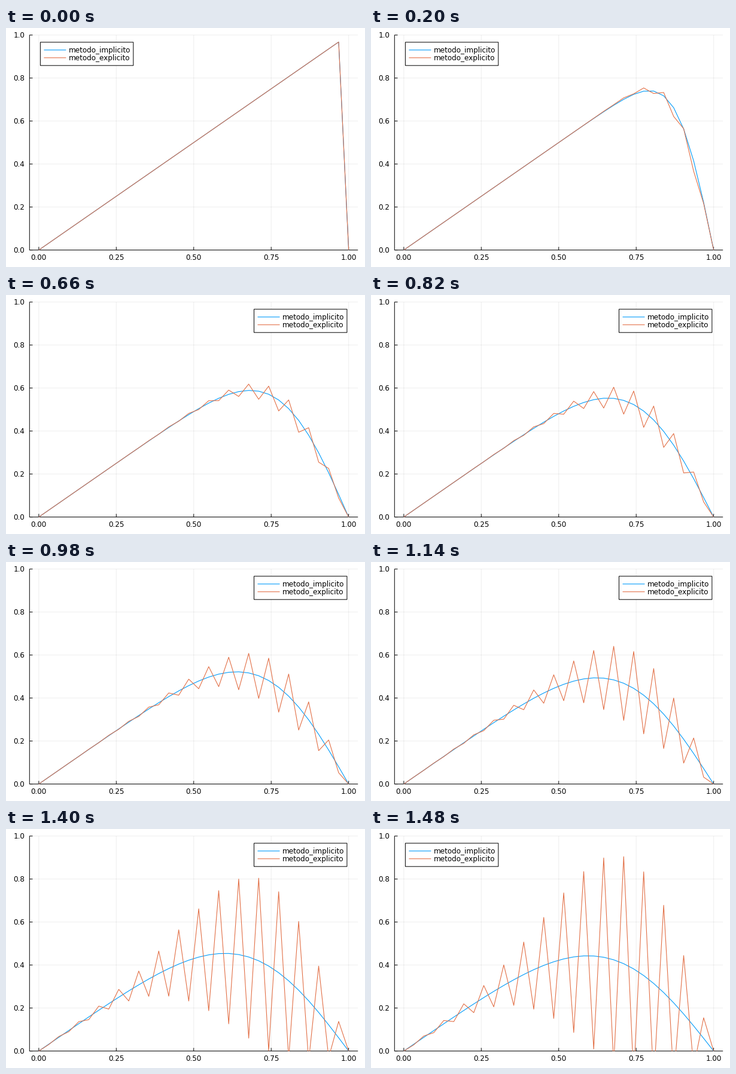
A matplotlib script that plays this animation: 600x400 px, repeating every 1.5 s.

```python
import numpy as np
import matplotlib.pyplot as plt
from matplotlib.animation import FuncAnimation
from matplotlib.patches import Rectangle

W, H, DPI = 600, 400, 100
FRAMES, INTERVAL = 75, 20
NODES, R = 32, 0.52            # grid points, dt / dx^2
LEFT, RIGHT, TOP, BOTTOM = 39.3, 588.2, 11.8, 371.6
X_MIN, X_MAX = -0.03, 1.03
BLUE, ORANGE = "#009AFA", "#E26F46"
PX = 72 / DPI                  # points per pixel


def to_px(x):
    return LEFT + (x - X_MIN) / (X_MAX - X_MIN) * (RIGHT - LEFT)


def to_py(y):
    return BOTTOM - y * (BOTTOM - TOP)


def solve():
    """Heat equation from u = x with u(1) = 0, by both schemes."""
    x = np.linspace(0, 1, NODES)
    start = x.copy()
    start[-1] = 0
    n = NODES - 2
    lap = 2 * np.eye(n) - np.eye(n, k=1) - np.eye(n, k=-1)
    forward = np.eye(n) - R * lap
    backward = np.linalg.inv(np.eye(n) + R * lap)

    def march(step):
        states = [start]
        for _ in range(FRAMES - 1):
            u = np.zeros(NODES)
            u[1:-1] = step @ states[-1][1:-1]
            states.append(u)
        return states

    return x, march(backward), march(forward)


xs, implicit, explicit = solve()

fig = plt.figure(figsize=(W / DPI, H / DPI), dpi=DPI, facecolor="white")
ax = fig.add_axes([0, 0, 1, 1])
ax.set_xlim(0, W)
ax.set_ylim(H, 0)
ax.axis("off")


def line(x, y, color="black", width=1.0, z=2, **kw):
    return ax.plot(x, y, color=color, lw=width * PX, zorder=z, snap=False,
                   solid_capstyle="butt", solid_joinstyle="round", **kw)[0]


def label(x, y, text, ha, z=2):
    return ax.text(x, y, text, ha=ha, va="baseline", fontsize=12 * PX,
                   family="DejaVu Sans", color="black", zorder=z)


# grid, ticks and tick labels
for v in np.linspace(0, 1, 5):
    p = to_px(v)
    line([p, p], [TOP, BOTTOM], alpha=0.065, z=1)
    line([p, p], [BOTTOM, BOTTOM - 5.2])
    label(p, 387.6, f"{v:.2f}", "center")
for v in np.linspace(0, 1, 6):
    p = to_py(v)
    line([LEFT, RIGHT], [p, p], alpha=0.065, z=1)
    line([LEFT, LEFT + 5.2], [p, p])
    label(31.3, p + 4.4, f"{v:.1f}", "right")
line([LEFT, RIGHT], [BOTTOM, BOTTOM])
line([LEFT, LEFT], [TOP, BOTTOM])

# curves
area = Rectangle((LEFT, TOP), RIGHT - LEFT, BOTTOM - TOP, transform=ax.transData)
curves = [line([], [], c, 1.1, z=3) for c in (BLUE, ORANGE)]
for c in curves:
    c.set_clip_path(area)

# legend
BOX_W, BOX_H, BOX_Y = 155.4, 39, 23.8
box = Rectangle((0, BOX_Y), BOX_W, BOX_H, fc="white", ec="black",
                lw=PX, zorder=4, snap=False)
ax.add_patch(box)
keys, names = [], []
for row, (color, name) in enumerate(((BLUE, "metodo_implicito"),
                                     (ORANGE, "metodo_explicito"))):
    y = BOX_Y + 13 * (row + 1)
    keys.append(line([0, 0], [y, y], color, 1.1, z=5))
    names.append(label(0, y + 4.4, name, "left", z=5))


def legend_left(states):
    """Top right, unless a point lies in that corner of the plot."""
    sx = (xs - X_MIN) / (X_MAX - X_MIN)
    crowded = any(np.any((sx > 0.75) & (u > 0.75) & (u <= 1)) for u in states)
    return LEFT + 18.1 if crowded else RIGHT - 18.3 - BOX_W


def draw(i):
    states = implicit[i], explicit[i]
    for curve, u in zip(curves, states):
        curve.set_data(to_px(xs), to_py(u))
    left = legend_left(states)
    box.set_x(left)
    for key, name in zip(keys, names):
        key.set_xdata([left + 6, left + 43])
        name.set_x(left + 47)
    return [*curves, box, *keys, *names]


anim = FuncAnimation(fig, draw, frames=FRAMES, interval=INTERVAL,
                     repeat=True, repeat_delay=0, blit=False)
plt.show()
```
